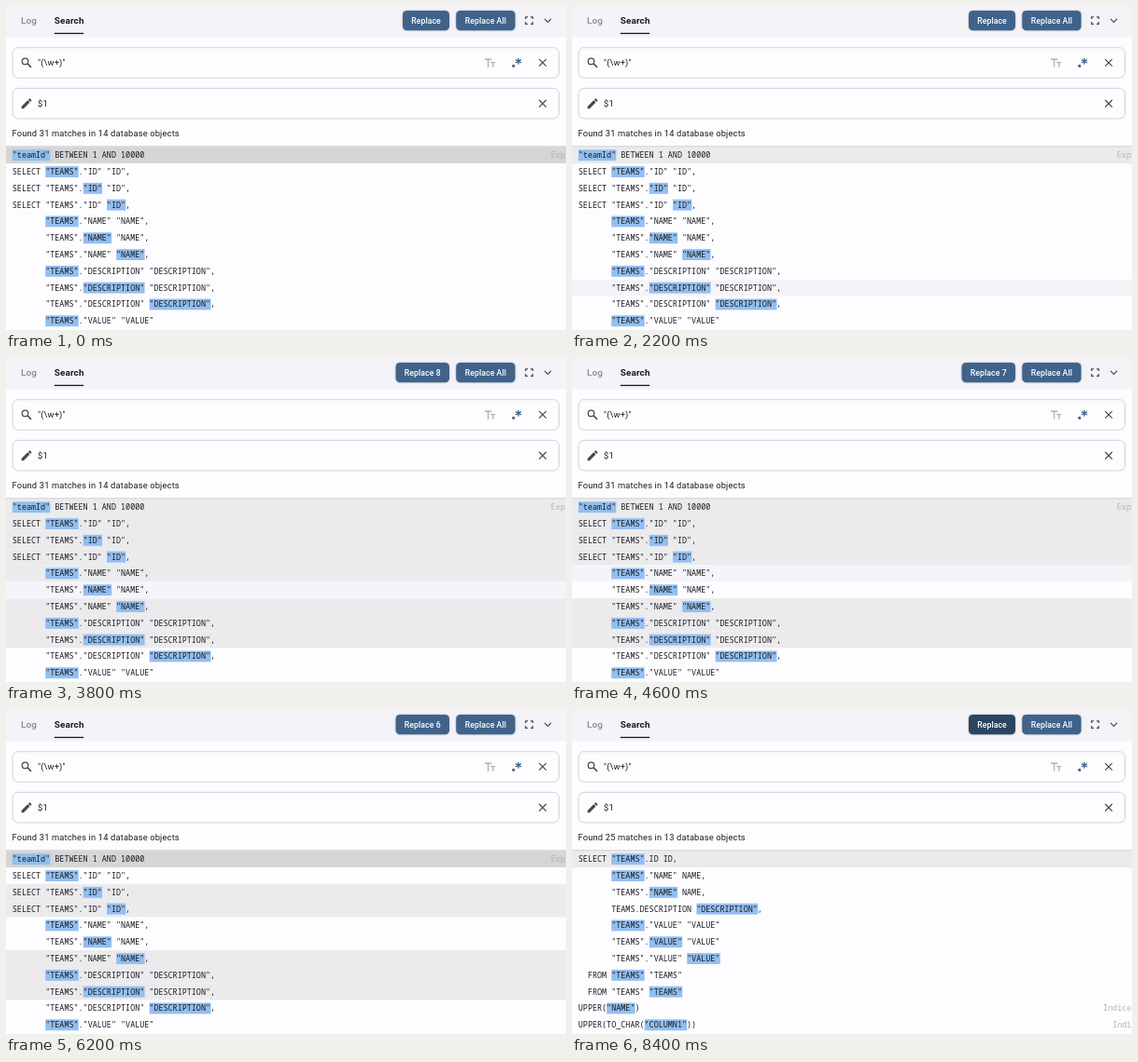
Recreate the animation shown at these times as an HTML page. Size 600x348 px, loop 8.6 s.

```html
<!DOCTYPE html>
<html lang="en">
<head>
<meta charset="utf-8">
<title>Search and replace</title>
<style>
  html, body { margin: 0; width: 100%; height: 100%; overflow: hidden; background: #fdfcff; }
  svg { display: block; width: 600px; height: 348px; }
  text { font-family: Roboto, sans-serif; fill: #1b1b1f; white-space: pre; }
  .code text { font-family: "Noto Sans Mono", monospace; font-size: 8.44px; }
  .code .note { fill: #b3b2b7; }
  .body { font-size: 9.3px; letter-spacing: .166px; }
  .tab { font-size: 9.9px; letter-spacing: .15px; font-weight: 500; }
  .btn text { font-size: 8.7px; letter-spacing: .07px; font-weight: 500; fill: #fff; text-anchor: middle; }
  .btn rect { filter: drop-shadow(0 .8px .8px rgba(0, 0, 0, .28)); }
  .line { fill: none; stroke: #46464a; stroke-width: 1.2; }
  .field { fill: #fdfcff; stroke: #c8c7ce; stroke-width: .8; }
</style>
</head>
<body>
<svg viewBox="0 0 600 348">
  <rect width="600" height="348" fill="#fdfcff"/>
  <rect width="600" height="33.5" fill="#f4f3f8"/>
  <text class="tab" x="16" y="19" style="fill:#88878d">Log</text>
  <text class="tab" x="51.8" y="19" style="font-weight:700">Search</text>
  <rect x="51.8" y="28.8" width="31.4" height="1.3" fill="#1b1b1f"/>

  <g class="btn">
    <rect id="one" y="5" height="21.3" rx="4.5"/>
    <text id="oneLabel" y="18.6"></text>
    <rect x="482.3" y="5" width="63.2" height="21.3" rx="4.5" fill="#3f638b"/>
    <text x="513.9" y="18.6">Replace All</text>
  </g>
  <path class="line" d="M556.7 14V11.8H559M562 11.8H564.3V14M564.3 17V19.3H562M559 19.3H556.7V17"/>
  <path class="line" d="M577 13.8L580.5 17.3L584 13.8"/>

  <rect class="field" x="7" y="44.7" width="585.5" height="32.6" rx="6"/>
  <rect class="field" x="7" y="88.4" width="585.5" height="32.6" rx="6"/>
  <g class="line">
    <circle cx="20.5" cy="59.4" r="3.3"/>
    <path d="M23 61.9L27 65.9" stroke-width="1.5"/>
    <path id="close" d="M571.2 57.1L578.8 64.7M578.8 57.1L571.2 64.7"/>
    <use href="#close" y="43.9"/>
  </g>
  <path transform="translate(14.8 97.6) scale(.6)" fill="#46464a" d="M3 17.25V21h3.75L17.81 9.94l-3.75-3.75zM20.71 7.04a1 1 0 0 0 0-1.41l-2.34-2.34a1 1 0 0 0-1.41 0l-1.83 1.83 3.75 3.75z"/>
  <path class="line" style="stroke:#b3b2b7;stroke-width:1.4" d="M512.8 57.2H520.4M516.6 57.2V65.7M519.3 60.6H524.2M521.8 60.6V65.7"/>
  <g stroke="#3f638b" stroke-width="1.3">
    <rect x="542.4" y="63" width="2.8" height="2.8" fill="#3f638b" stroke="none"/>
    <path d="M549 55.9V62.7M546 57.6L552 61M552 57.6L546 61"/>
  </g>
  <text class="body" x="34" y="64.2">"(\w+)"</text>
  <text class="body" x="34" y="108.2">$1</text>
  <text class="body" id="found" x="6.6" y="139.8"></text>

  <g class="code" id="rows"></g>
  <rect y="150.4" width="600" height=".9" fill="#c9c8cd"/>
</svg>
<script>
  const NS = "http://www.w3.org/2000/svg";
  const LOOP = 8600, TOP = 151.3, PITCH = 17.8, LEFT = 6.8, CHAR = 5.064;
  const byId = id => document.getElementById(id);
  const pad = " ".repeat(7);

  // Square brackets mark a highlighted match.
  const before = [
    '["teamId"] BETWEEN 1 AND 10000',
    'SELECT ["TEAMS"]."ID" "ID",',
    'SELECT "TEAMS".["ID"] "ID",',
    'SELECT "TEAMS"."ID" ["ID"],',
    ...["NAME", "DESCRIPTION"].flatMap(n => [
      `${pad}["TEAMS"]."${n}" "${n}",`,
      `${pad}"TEAMS".["${n}"] "${n}",`,
      `${pad}"TEAMS"."${n}" ["${n}"],`
    ]),
    pad + '["TEAMS"]."VALUE" "VALUE"'
  ];
  const after = [
    'SELECT ["TEAMS"].ID ID,',
    pad + '["TEAMS"]."NAME" NAME,',
    pad + '"TEAMS".["NAME"] NAME,',
    pad + 'TEAMS.DESCRIPTION ["DESCRIPTION"],',
    pad + '["TEAMS"]."VALUE" "VALUE"',
    pad + '"TEAMS".["VALUE"] "VALUE"',
    pad + '"TEAMS"."VALUE" ["VALUE"]',
    '  FROM ["TEAMS"] "TEAMS"',
    '  FROM "TEAMS" ["TEAMS"]',
    'UPPER(["NAME"])',
    'UPPER(TO_CHAR(["COLUMN1"]))'
  ];

  function add(parent, name, attrs, label) {
    const el = document.createElementNS(NS, name);
    for (const k in attrs) el.setAttribute(k, attrs[k]);
    if (label) el.textContent = label;
    parent.appendChild(el);
    return el;
  }

  const backs = before.map((_, i) =>
    add(byId("rows"), "rect", { y: TOP + i * PITCH, width: 600, height: PITCH }));

  function buildList(lines, notes) {
    const g = add(byId("rows"), "g", {});
    lines.forEach((line, i) => {
      const y = TOP + i * PITCH;
      const from = line.indexOf("["), size = line.indexOf("]") - from - 1;
      add(g, "rect", { x: LEFT + from * CHAR, y: y + 3, width: size * CHAR, height: 11.9, fill: "#92bff0" });
      add(g, "text", { x: LEFT, y: y + 11.9 }, line.replace(/[[\]]/g, ""));
      if (notes[i]) add(g, "text", { x: notes[i][0], y: y + 11.9, class: "note" }, notes[i][1]);
    });
    return g;
  }
  const lists = [
    buildList(before, { 0: [583.8, "Exp"] }),
    buildList(after, { 9: [569, "Indice"], 10: [579.2, "Indi"] })
  ];

  // [time, row under the pointer], 0 when it is off the list
  const hovers = [
    [0, 1], [400, 2], [600, 3], [800, 4], [1000, 5], [1200, 6], [1400, 7], [1800, 8], [2000, 9],
    [2800, 8], [3200, 7], [3400, 6], [4200, 5], [5000, 3], [5200, 2], [6200, 1], [6600, 0]
  ];
  const RANGE_AT = 2400, PRESS_AT = 7000, DONE_AT = 8400;
  const dropped = { 6: 3800, 5: 4400, 2: 5600 };

  function isSelected(row, t) {
    if (row === 1) return true;
    return t >= RANGE_AT && t < DONE_AT && row <= 9 && !(t >= dropped[row]);
  }

  function render(t) {
    const done = t >= DONE_AT;
    const hover = hovers.filter(h => h[0] <= t).pop()[1];
    let count = 0;
    backs.forEach((rect, i) => {
      const on = isSelected(i + 1, t), over = hover === i + 1;
      count += on;
      rect.setAttribute("fill", on ? (over ? "#d5d4d7" : "#ebeaed") : over ? "#f5f4f8" : "#fdfcff");
    });
    const left = count > 1 ? 417.6 : 425;
    byId("one").setAttribute("x", left);
    byId("one").setAttribute("width", 475 - left);
    byId("one").setAttribute("fill", t >= PRESS_AT ? "#29455f" : "#3f638b");
    byId("oneLabel").setAttribute("x", (left + 475) / 2);
    byId("oneLabel").textContent = count > 1 ? "Replace " + count : "Replace";
    byId("found").textContent = `Found ${done ? 25 : 31} matches in ${done ? 13 : 14} database objects`;
    lists[0].setAttribute("display", done ? "none" : "inline");
    lists[1].setAttribute("display", done ? "inline" : "none");
  }

  const start = performance.now();
  function tick() {
    render((performance.now() - start) % LOOP);
    requestAnimationFrame(tick);
  }
  tick();
</script>
</body>
</html>
```
